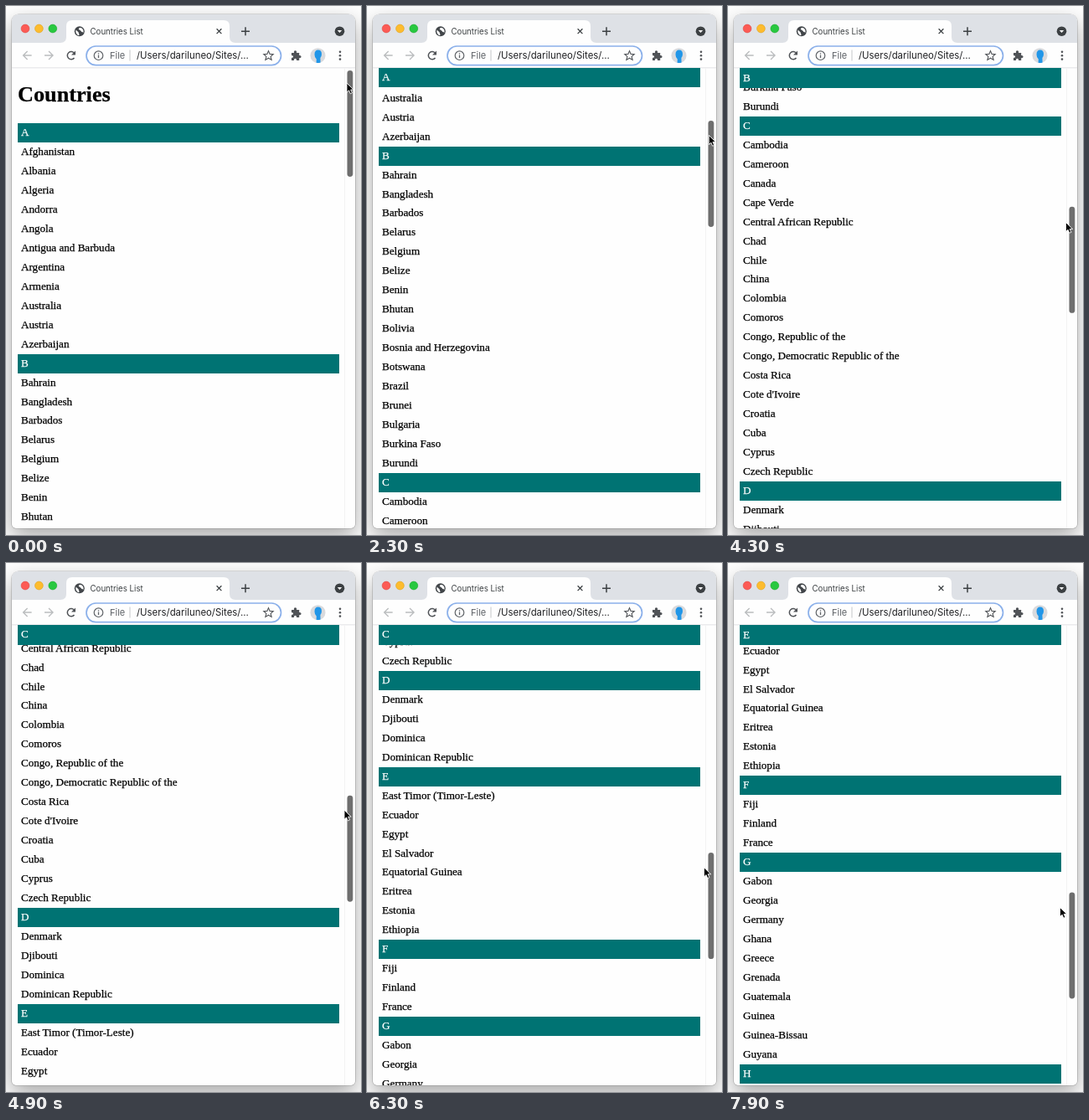
Animation, 424 px wide and 632 px high, one loop 8 s. Source, as an HTML page:

```html
<!DOCTYPE html>
<html lang="en">
<head>
<meta charset="utf-8">
<title>Countries List</title>
<style>
  html, body { margin: 0; width: 424px; height: 632px; overflow: hidden; background: #fefefe; }
  body { position: relative; }
  .window { position: absolute; left: 7px; top: 10px; width: 410px; height: 614px; border-radius: 8px 8px 5px 5px;
    background: #fefefe; box-shadow: 0 0 0 .6px rgba(0,0,0,.22), 0 10px 26px rgba(0,0,0,.34); }
  .page { position: absolute; left: 7px; top: 74.3px; width: 410px; height: 549.7px; overflow: hidden;
    border-radius: 0 0 5px 5px; font: 13.1px "Liberation Serif", serif; color: #000; -webkit-text-stroke: .25px; }
  h1 { margin: 0 0 0 7px; height: 65.9px; font-size: 26.24px; line-height: 64.6px; }
  ul { margin: 0 0 0 7px; padding: 0; width: 384px; list-style: none; }
  li { height: 22.96px; line-height: 22.96px; padding-left: 4px; }
  li.letter { position: sticky; top: 0; background: #007373; color: #fff; }
  svg { position: absolute; left: 0; top: 0; }
  text { font-family: Inter, sans-serif; }
</style>
</head>
<body>
<div class="window"></div>

<svg width="424" height="632" fill="none">
  <!-- tab strip -->
  <path d="M7 44V18a8 8 0 0 1 8-8H409a8 8 0 0 1 8 8V44z" fill="#dee1e6"/>
  <path d="M65 44q7 0 7-7V24q0-7 7-7H260q7 0 7 7V37q0 7 7 7z" fill="#fefefe"/>
  <g stroke-width=".6">
    <circle cx="23" cy="27" r="4.9" fill="#fc5b55" stroke="#e0443e"/>
    <circle cx="39.4" cy="27" r="4.9" fill="#fdbc2e" stroke="#dea123"/>
    <circle cx="55.8" cy="27" r="4.9" fill="#28c840" stroke="#1aab29"/>
  </g>
  <circle cx="87.8" cy="30.2" r="6" fill="#42464a"/>
  <path d="M83.4 28.6l3.1 2.6 1.1 3.2-1.2.9q-3.6-2.2-3-6.7zM88 25.6l-1.4 2.2 2.6 1.6 1.2 1.6 2.2.4q.2-4.6-4.6-5.8z" fill="#fefefe"/>
  <text x="100.5" y="33.9" font-size="9.7" fill="#3c4043">Countries List</text>
  <path d="M251.6 27.3l5.8 5.8m0-5.8l-5.8 5.8" stroke="#3c4043" stroke-width="1.3"/>
  <path d="M281 30.2h10m-5-5v10" stroke="#3c4043" stroke-width="1.5"/>
  <circle cx="398.5" cy="30.2" r="5.8" fill="#3c4043"/>
  <path d="M395.8 28.9h5.4l-2.7 3z" fill="#fefefe"/>

  <!-- toolbar -->
  <path d="M7 44H417V74H7z" fill="#fefefe"/>
  <path d="M7 73.8H417" stroke="#dcdee1" stroke-width=".8"/>
  <g stroke="#bbbdbf" stroke-width="1.4">
    <path d="M30.6 59H20.6m5-5l-5 5 5 5"/>
    <path d="M46 59H56m-5-5l5 5-5 5"/>
  </g>
  <path d="M81.5 62a4.6 4.6 0 1 1 .1-5.6" stroke="#505357" stroke-width="1.5"/>
  <path d="M83 53.6v5h-5z" fill="#505357"/>
  <rect x="96" y="48" width="232.5" height="22.6" rx="11.3" fill="#fefefe" stroke="#8bb0ea" stroke-width="1.7"/>
  <circle cx="110.5" cy="59.2" r="5.3" stroke="#5f6368" stroke-width="1.2"/>
  <path d="M110.5 58.4v3.6m0-5.8v1.3" stroke="#5f6368" stroke-width="1.3"/>
  <text x="124" y="63.2" font-size="11" fill="#5f6368">File</text>
  <path d="M148 52.5v13" stroke="#c4c6c9"/>
  <text x="156" y="63.2" font-size="11.4" fill="#202124">/Users/dariluneo/Sites/...</text>
  <path d="M313.5 53.6l1.6 3.8 4.1.3-3.1 2.7 1 4-3.6-2.2-3.6 2.2 1-4-3.1-2.7 4.1-.3z" stroke="#505357" stroke-width="1.1"/>
  <path d="M341 56h3q-.6-2.8 1.5-2.8T347 56h3.2v3.1q2.4-.3 2.4 1.5t-2.4 1.5v3h-3.1q0-2.3-1.6-2.3t-1.6 2.3H341v-3q2.2-.1 2.2-1.5T341 59.1z" fill="#505357"/>
  <circle cx="372.5" cy="59.2" r="9" fill="#d9dadd"/>
  <path d="M372.8 52.6q4.2 0 4.2 5 0 3-1.6 4.4l.2 5.5q-2.6 1-5 .2l.2-4.2q-2.3-1.8-2.3-5.4 0-5.5 4.3-5.5z" fill="#2196e8"/>
  <g fill="#505357"><circle cx="399" cy="54.8" r="1.3"/><circle cx="399" cy="59.2" r="1.3"/><circle cx="399" cy="63.6" r="1.3"/></g>
</svg>

<div class="page" id="page"><h1>Countries</h1><ul id="list"></ul></div>

<!-- scrollbar and pointer -->
<svg width="424" height="632">
  <path d="M404.5 74.3V624" stroke="#f3f3f3"/>
  <rect id="thumb" x="407.5" width="6.8" height="127" rx="3.4" fill="#6e6e6e"/>
  <path id="pointer" d="M0 0V11.2L2.6 8.8 4.3 12.8 6.4 11.9 4.7 8H8.2z" fill="#000" stroke="#fff" stroke-width=".9"/>
</svg>

<script>
const countries = `Afghanistan|Albania|Algeria|Andorra|Angola|Antigua and Barbuda|Argentina|Armenia|Australia|Austria|Azerbaijan|
Bahrain|Bangladesh|Barbados|Belarus|Belgium|Belize|Benin|Bhutan|Bolivia|Bosnia and Herzegovina|Botswana|Brazil|Brunei|Bulgaria|Burkina Faso|Burundi|
Cambodia|Cameroon|Canada|Cape Verde|Central African Republic|Chad|Chile|China|Colombia|Comoros|Congo, Republic of the|Congo, Democratic Republic of the|Costa Rica|Cote d'Ivoire|Croatia|Cuba|Cyprus|Czech Republic|
Denmark|Djibouti|Dominica|Dominican Republic|
East Timor (Timor-Leste)|Ecuador|Egypt|El Salvador|Equatorial Guinea|Eritrea|Estonia|Ethiopia|
Fiji|Finland|France|
Gabon|Georgia|Germany|Ghana|Greece|Grenada|Guatemala|Guinea|Guinea-Bissau|Guyana|
Haiti|Honduras|Hungary`;

const $ = id => document.getElementById(id);
const page = $('page'), thumb = $('thumb'), pointer = $('pointer');

function addRow(text, className = '') {
  const row = document.createElement('li');
  row.textContent = text;
  row.className = className;
  $('list').append(row);
}
for (const line of countries.split('|\n')) {
  addRow(line[0], 'letter');
  line.split('|').forEach(name => addRow(name));
}

const LOOP = 8000, STEP = 100, SCROLL_RATIO = 4.137;
// time, scroll offset, pointer x, pointer distance below the thumb's top
const keys = [
  [0, 0, 407, 15], [600, 0, 407.5, 17], [2300, 248, 408.3, 17.5], [3600, 503, 402.8, 20], [4900, 830, 404, 17.5],
  [5700, 1038, 400.5, 17.5], [7000, 1187, 405, 18], [7900, 1309, 396.5, 18],
];

// Monotone cubic interpolation through one column of the keys.
function sample(column, t) {
  const last = keys.length - 1;
  const secant = i => (keys[i + 1][column] - keys[i][column]) / (keys[i + 1][0] - keys[i][0]);
  const slope = i => {
    if (i === 0) return secant(0);
    if (i === last) return secant(last - 1);
    const a = secant(i - 1), b = secant(i);
    return a * b > 0 ? 2 * a * b / (a + b) : 0;
  };
  let i = 0;
  while (i < last - 1 && t >= keys[i + 1][0]) i++;
  const [from, to] = [keys[i], keys[i + 1]];
  const span = to[0] - from[0], u = (t - from[0]) / span, v = 1 - u;
  return from[column] * v * v * (1 + 2 * u) + to[column] * u * u * (1 + 2 * v)
    + span * u * v * (slope(i) * v - slope(i + 1) * u);
}

function draw() {
  const t = Math.floor(performance.now() % LOOP / STEP) * STEP;
  const scroll = sample(1, t), top = 77 + scroll / SCROLL_RATIO;
  page.scrollTop = Math.round(scroll);
  thumb.setAttribute('y', top);
  pointer.setAttribute('transform', `translate(${sample(2, t)} ${top + sample(3, t)})`);
  requestAnimationFrame(draw);
}
draw();
</script>
</body>
</html>
```
